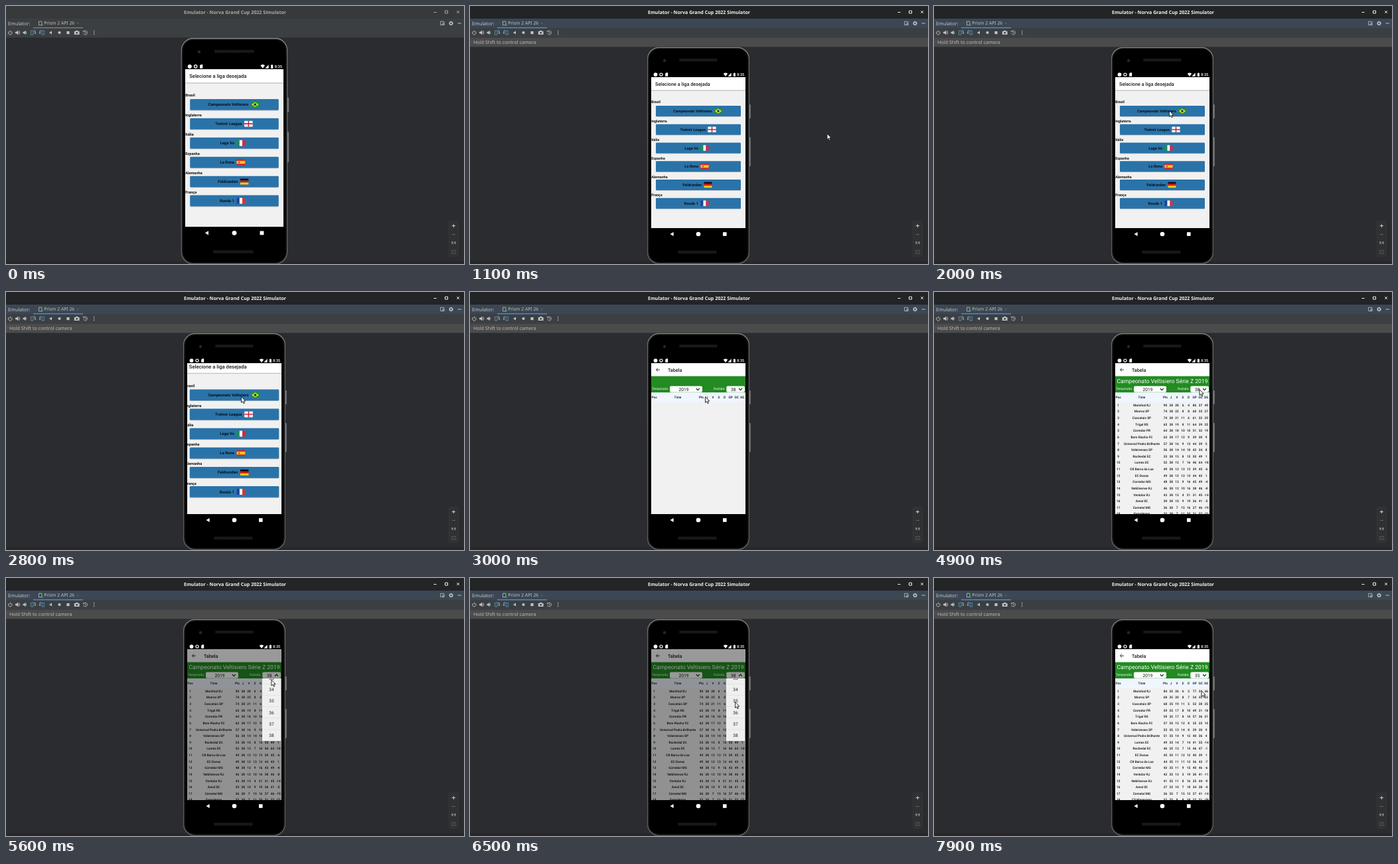
Recreate the animation shown at these times as an HTML page. Size 690 by 388 pixels, loop 8000 ms.

```html
<!DOCTYPE html>
<html lang="pt">
<head>
<meta charset="utf-8">
<title>Emulator</title>
<style>
  html, body { margin: 0; width: 100%; height: 100%; overflow: hidden; background: #2b2c2f; }
  svg { display: block; width: 690px; height: 388px; text-rendering: geometricPrecision; }
  .ui { font-family: "Noto Sans", "Open Sans", sans-serif; }
  .app { font-family: Roboto, Arial, sans-serif; }
</style>
</head>
<body>
<svg id="stage" viewBox="0 0 690 388"></svg>
<script>
const LOOP = 8000;
const stage = document.getElementById('stage');
const $ = id => document.getElementById(id);

// Text is placed by its vertical centre.
const text = (x, y, s, size, fill = '#111', extra = '') =>
  `<text x="${x}" y="${(y + size * .36).toFixed(2)}" font-size="${size}" fill="${fill}" ${extra}>${s}</text>`;
const rect = (x, y, w, h, fill, extra = '') =>
  `<rect x="${x}" y="${y}" width="${w}" height="${h}" fill="${fill}" ${extra}/>`;
const circle = (x, y, r, fill, extra = '') =>
  `<circle cx="${x}" cy="${y}" r="${r}" fill="${fill}" ${extra}/>`;
const line = (d, color, width = 1, extra = '') =>
  `<path d="${d}" fill="none" stroke="${color}" stroke-width="${width}" ${extra}/>`;
const shape = (d, fill, extra = '') => `<path d="${d}" fill="${fill}" ${extra}/>`;
const MID = ' text-anchor="middle"', END = ' text-anchor="end"';
const BOLD = ' font-weight="700"', MEDIUM = ' font-weight="500"';

// ---- desktop window ----
function windowControls() {
  return line('M644.5 9.5h4', 'currentColor') +
    line('M661.5 7.2h4v3.8h-4z', 'currentColor') +
    line('M679.3 7.2l3.6 3.6M682.9 7.2l-3.6 3.6', 'currentColor');
}

function toolbar() {
  const c = '#c0c2c4', blue = '#4f96c8';
  const speaker = x => shape(`M${x - 3} 38.8h1.8l2.2-2v6.4l-2.2-2h-1.8z`, c);
  return line('M4.6 38a2.8 2.8 0 1 0 3.4 0M6.3 36.6v3.4', c, .9) +
    speaker(17) + line('M18.3 38.2q1.4 1.8 0 3.6M19.6 37q2.6 3 0 6', c, .8) +
    speaker(28.5) + line('M30 38.2q1.4 1.8 0 3.6', c, .8) +
    line('M37.6 37.2h3.4v5.8h-3.4z', blue, .9) + line('M42 37.2h2v4M42.8 40.2l1.2 1.4 1.2-1.4', c, .8) +
    line('M54 37.2h3.4v5.8h-3.4z', blue, .9) + line('M53 37.2h-2v4M49.8 40.2l1.2 1.4 1.2-1.4', c, .8) +
    shape('M69 37.6v4.8l-4-2.4z', c) + circle(80.5, 40, 2.1, c) + rect(91.4, 38, 4.2, 4.2, c) +
    shape('M102.8 38h2l.8-1.3h2.2l.8 1.3h2v5h-7.8z', c) + circle(106.7, 40.4, 1.4, '#3c3f41') +
    line('M117 38.4a3 3 0 1 1-.3 2.6M116.6 36.8v2h2M119.8 38.4v1.9l1.4.8', c, .8) +
    [37.4, 40, 42.6].map(y => circle(132.6, y, .75, c)).join('');
}

function desktop() {
  const c = '#bfc1c3';
  return `<g class="ui">
    ${rect(0, 0, 690, 388, '#2b2c2f')}
    ${rect(0, 0, 690, 19, '#37393a', 'id="titleBar"')}
    <g id="title">${text(345, 9.4, 'Emulator - Norva Grand Cup 2022 Simulator', 7.1, 'currentColor', BOLD + MID)}${windowControls()}</g>
    ${rect(0, 19, 690, 14, '#3c3f41', 'id="tabBar"')}
    ${text(3, 26, 'Emulator:', 7.3, '#c3c5c7')}
    ${line('M49.5 23.2h4.4v5.6h-4.4z', c, .8)}${circle(54.2, 28.5, 1.3, '#57a65b')}
    ${text(57.2, 26, 'Prism 2 API 26', 6.8, '#c3c5c7')}
    ${line('M107.2 24.8l2.2 2.2M109.4 24.8l-2.2 2.2', '#777b7e', .6)}
    ${line('M654.5 23.3h5.4v5.2h-5.4zM657.5 26h2.4v2.5h-2.4z', c, .8)}
    ${circle(670.5, 26, 2, 'none', `stroke="${c}" stroke-width="1.4"`)}
    ${circle(670.5, 26, 2.9, 'none', `stroke="${c}" stroke-width=".9" stroke-dasharray="1.2 1.08"`)}
    ${line('M680.5 26h5.4', c)}
    ${rect(0, 33, 690, 14.5, '#3c3f41')}
    ${rect(41, 32, 75, 1.5, '#747a80', 'id="tabLine"')}
    ${toolbar()}
    <g id="banner">${rect(0, 47.5, 690, 14, '#4a4b4a')}${text(5, 54.5, 'Hold Shift to control camera', 7.2, '#bbbcbd')}</g>
    ${rect(0, 384, 690, 4, '#292629')}
    ${rect(667.5, 323.5, 14, 53, '#2f3133', 'rx="2" stroke="#393b3d" stroke-width=".7"')}
    ${line('M671.8 330.5h5M674.3 328v5', '#d0d1d2')}${line('M671.8 343.5h5', '#5f6163')}
    ${text(674.3, 356.6, '1:1', 5.2, '#e0e0e0', MID + BOLD)}
    ${line('M671.3 367.5h6v5h-6zM672.7 371l3.2-2.2', '#5f6163', .7)}
  </g>`;
}

// ---- phone ----
function grille(x, y, w) {
  return rect(x, y, w, 4.6, '#0d0d0e', 'rx="1.5"') +
    [1.3, 3.3].map(dy => line(`M${x + 1} ${y + dy}h${w - 2}`, '#3a3a3c', .9, 'stroke-dasharray="1.3 1.1"')).join('');
}

function phoneBody() {
  const w = '#fff';
  return rect(419, 148, 3.8, 21, '#77787a', 'rx="1"') + rect(419, 197, 3.8, 44, '#77787a', 'rx="1"') +
    rect(267.6, 62.7, 152.8, 324.6, '#000', 'rx="17" stroke="url(#rim)" stroke-width="1.3"') +
    rect(269.2, 64.3, 149.6, 321.4, 'none', 'rx="15.5" stroke="#1d1d1f" stroke-width="1"') +
    circle(293, 82, 2.5, '#191a1d') + circle(293, 82, 1.1, '#363940') +
    grille(315, 79, 58) + grille(313, 367.8, 59) +
    circle(279.5, 103.1, 2.9, w) + circle(288, 103.1, 2.1, 'none', 'stroke="#fff" stroke-width="1.2"') +
    shape('M294.2 101.8l1.4-1.5h2.6v5.4h-4z', w) +
    shape('M381.8 101.7q3.2-2.6 6.4 0l-3.2 4.2z', w) + shape('M393.6 100.6v5.2h-5z', w) +
    rect(396.9, 101, 3, 4.9, w) + rect(397.8, 100.4, 1.2, .8, w) +
    text(402.3, 103.2, '8:35', 5.5, w, MEDIUM) +
    shape('M306.6 340v6l-5-3z', w) + circle(344, 343, 3.3, w) + rect(381, 340.2, 5.6, 5.6, w);
}

// ---- league list ----
const bands = (colors, vertical) => colors.map((c, i) => vertical
  ? rect(i * 4, 0, 4.05, 8.4, c) : rect(0, i * 2.8, 12, 2.85, c)).join('');
const leagues = [
  ['Brasil', 'Campeonato Veltisiero', 364.5, rect(0, 0, 12, 8.4, '#159a3c') +
    shape('M6 .8l5 3.4-5 3.4-5-3.4z', '#f8dc1c') + circle(6, 4.2, 1.8, '#22306f')],
  ['Inglaterra', 'Trelmir League', 355, rect(0, 0, 12, 8.4, '#fff') +
    line('M6 0v8.4M0 4.2h12', '#d8202f', 1.6)],
  ['Itália', 'Lega Vo', 344, bands(['#159247', '#fff', '#d42b39'], true)],
  ['Espanha', 'La Rona', 344, rect(0, 0, 12, 8.4, '#d2202b') + rect(0, 2.1, 12, 4.2, '#fbc81c') +
    rect(2.5, 2.9, 2, 2.6, '#b9502a')],
  ['Alemanha', 'Feldrunden', 349, bands(['#111', '#da1616', '#fccc13'])],
  ['França', 'Rondo 1', 344, bands(['#22409a', '#fff', '#e22f3d'], true)],
];

const pageBase = () => rect(273, 107, 142, 227, '#f1f1f1') + rect(273, 107, 142, 19.6, '#fff');

function leaguePage() {
  const items = leagues.map(([country, name, end, flag], i) => {
    const y = 158 + i * 27.73;
    return text(273.2, y - (i ? 12.3 : 13.5), country, 5.4, '#111', BOLD) +
      rect(280, y - 7.4, 128, 16.2, '#b4b8bc', 'rx="1.2"') +
      rect(280, y - 8, 128, 16, '#2a73a9', 'rx="1.2"') +
      text(end, y, name, 5.7, '#0b1116', BOLD + END) +
      `<g transform="translate(${end + 3.5} ${y - 4.2})">${flag}</g>`;
  }).join('');
  return pageBase() + rect(273, 126.4, 142, 1.3, '#c4c4c4') +
    text(279, 117.3, 'Selecione a liga desejada', 7.3, '#1c1c1e', MEDIUM) + items;
}

// ---- standings: name, wins, draws, goals for, goals against ----
const round38 = `Marinhal RJ,28,6,86,37|Morros SP,22,8,60,33|Cascatais SP,21,11,61,32|Trigal RS,19,8,64,39
|Corredor PR,18,10,51,32|Bom Riacho FC,17,12,39,30|Universal Pedra Brilhante,16,9,44,39|Veleirenses SP,14,14,42,34
|Rochedal EC,15,8,50,49|Lumes EC,15,7,46,64|CR Barco da Lua,12,13,39,45|EC Dunas,12,13,44,43
|Corredor MG,13,9,45,49|Neblinense RJ,12,10,38,46|Ventolar RJ,13,4,31,45|Areal SC,10,9,36,41
|Cometal MG,7,15,27,46|Garoalense,7,11,31,52`;
const round35 = `Marinhal RJ,26,6,77,31|Morros SP,20,8,54,32|Cascatais SP,19,11,53,28|Corredor PR,17,8,49,31
|Trigal RS,17,8,57,36|Bom Riacho FC,15,12,35,25|Veleirenses SP,13,14,39,30|Universal Pedra Brilhante,14,9,40,36
|Lumes EC,14,7,41,55|Rochedal EC,13,7,46,47|EC Dunas,11,12,40,39|CR Barco da Lua,11,11,36,43
|Corredor MG,11,9,40,46|Ventolar RJ,13,3,30,41|Neblinense RJ,11,8,35,44|Areal SC,10,7,34,38
|Cometal MG,7,15,27,41|CS Maresiano,8,8,23,51`;
const columns = [277.7, 313, 348.5, 357.2, 366, 375, 383.6, 392.6, 401.6, 410.2];
const tableRow = (cells, y) => cells.map((c, i) => text(columns[i], y, c, 4.8, '#0c0c0c', MID + MEDIUM)).join('');

function standings(data, games) {
  return data.split('|').map((entry, i) => {
    const [name, ...numbers] = entry.trim().split(',');
    const [won, drawn, scored, taken] = numbers.map(Number);
    return tableRow([i + 1, name, won * 3 + drawn, games, won, drawn, games - won - drawn,
      scored, taken, scored - taken], 170 + i * 9.63);
  }).join('');
}

const chevron = (x, up) => line(up ? `M${x - 2.4} 147.6l2.4-2.6 2.4 2.6` : `M${x - 2.4} 145l2.4 2.6 2.4-2.6`, '#222', 1.2);
const selectBox = (x, w) => rect(x, 141.6, w, 9.2, '#fff', 'rx="2"');

function tablePage() {
  return pageBase() +
    line('M286 117h-5.4M283 114.4l-2.6 2.6 2.6 2.6', '#222', .9) +
    text(298, 117.3, 'Tabela', 7.2, '#1c1c1e', MEDIUM) +
    rect(273, 126.6, 142, 24.6, '#228b22') +
    text(274, 145.2, 'Temporada:', 4.7, '#fff') + text(367, 145.2, 'Rodada:', 4.7, '#fff') +
    selectBox(301, 49) + selectBox(386.3, 27.6) +
    text(322, 146.3, '2019', 6.7, '#111', MID) + chevron(343.3) +
    `<g id="round"></g><g id="arrowDown">${chevron(407.5)}</g><g id="arrowUp">${chevron(407.5, true)}</g>` +
    rect(273, 151.2, 142, 14.6, '#f0f6ff') +
    tableRow(['Pos', 'Time', 'Pts', 'J', 'V', 'E', 'D', 'GP', 'GC', 'SG'], 158.3) +
    `<g id="heading">${text(344, 133.6, 'Campeonato Veltisiero Série Z 2019', 8.6, '#fff', MID)}</g>
    <g id="table38">${standings(round38, 38)}</g><g id="table35">${standings(round35, 35)}</g>`;
}

function dropdown() {
  const options = [33, 34, 35, 36, 37, 38].map(n => {
    const y = 236.6 - (38 - n) * 17.2;
    return text(400, y, n, 6.6, '#222', MID) + rect(386.5, y + 8.4, 27.4, .4, '#d2d2d2');
  }).join('');
  return rect(273, 107, 142, 227, '#000', 'opacity=".4"') +
    `<g clip-path="url(#listClip)">${rect(386, 151, 28, 94, '#efefef')}${options}</g>`;
}

stage.innerHTML = `
  <defs>
    <linearGradient id="rim" x2="0" y2="1">
      <stop offset="0" stop-color="#8c8d8f"/><stop offset=".08" stop-color="#68696b"/>
      <stop offset=".92" stop-color="#5c5d5f"/><stop offset="1" stop-color="#6e6f71"/>
    </linearGradient>
    <clipPath id="screenClip">${rect(273, 107, 142, 227, '#000')}</clipPath>
    <clipPath id="listClip">${rect(386, 151, 28, 94, '#000')}</clipPath>
  </defs>
  ${desktop()}
  <g id="phone" class="app">${phoneBody()}
    <g clip-path="url(#screenClip)">
      ${rect(273, 107, 142, 227, '#f1f1f1')}
      <g id="leagues">${leaguePage()}</g>
      <g id="tablePage">${tablePage()}</g>
      <g id="dropdown">${dropdown()}</g>
    </g>
  </g>
  <g id="cursor">${shape('M0 0v8.8l2-1.8 1.5 3.2 1.5-.7-1.5-3h2.7z', '#fff', 'stroke="#1a1a1a" stroke-width=".9"')}</g>`;

// ---- motion ----
const cursorPath = [[800, 632, 227], [1100, 538, 192], [1600, 372, 164], [1900, 354.5, 157.5], [3500, 354.5, 157.5],
  [4200, 400, 146.5], [5500, 400, 146.5], [6100, 399.5, 186.5], [7700, 399.5, 186.5], [7900, 403, 169.5]];
const clamp = v => Math.max(0, Math.min(1, v));

function cursorAt(t) {
  const next = cursorPath.findIndex(p => p[0] > t);
  if (next < 0) return cursorPath[cursorPath.length - 1].slice(1);
  const b = cursorPath[next], a = cursorPath[Math.max(0, next - 1)];
  const k = clamp((t - a[0]) / (b[0] - a[0] || 1));
  return [a[1] + (b[1] - a[1]) * k, a[2] + (b[2] - a[2]) * k];
}

const show = (id, on) => { $(id).style.display = on ? '' : 'none'; };
const zoom = (id, s) => $(id).setAttribute('transform', `translate(344 220.5) scale(${s}) translate(-344 -220.5)`);

function update(time) {
  const t = Math.floor(time / 100) * 100;
  const focused = t >= 800;
  $('titleBar').setAttribute('fill', focused ? '#222426' : '#37393a');
  $('title').style.color = focused ? '#f4f4f4' : '#a9abac';
  $('tabBar').setAttribute('fill', focused ? '#3b4754' : '#3c3f41');
  $('tabLine').setAttribute('fill', focused ? '#4a88c7' : '#747a80');
  show('banner', focused);
  $('phone').setAttribute('transform', focused ? '' : 'translate(-14.55 -16.7) scale(1.0423 1.0439)');

  const enter = clamp((t - 2800) / 200);
  zoom('leagues', 1 + .1 * clamp((t - 2700) / 200));
  zoom('tablePage', .9 + .1 * enter);
  $('tablePage').style.opacity = enter;
  show('leagues', enter < 1);

  const open = t >= 5500 && t < 6800;
  show('dropdown', open);
  show('arrowUp', open);
  show('arrowDown', !open);
  show('heading', t >= 3600);
  show('table38', t >= 3600 && t < 6900);
  show('table35', t >= 6900);
  $('round').innerHTML = text(396.7, 146.3, t < 6800 ? 38 : 35, 6.7, '#111', MID);

  show('cursor', focused);
  $('cursor').setAttribute('transform', `translate(${cursorAt(t).join(' ')})`);
}

const start = performance.now();
function tick() {
  update((performance.now() - start) % LOOP);
  requestAnimationFrame(tick);
}
tick();
</script>
</body>
</html>
```
